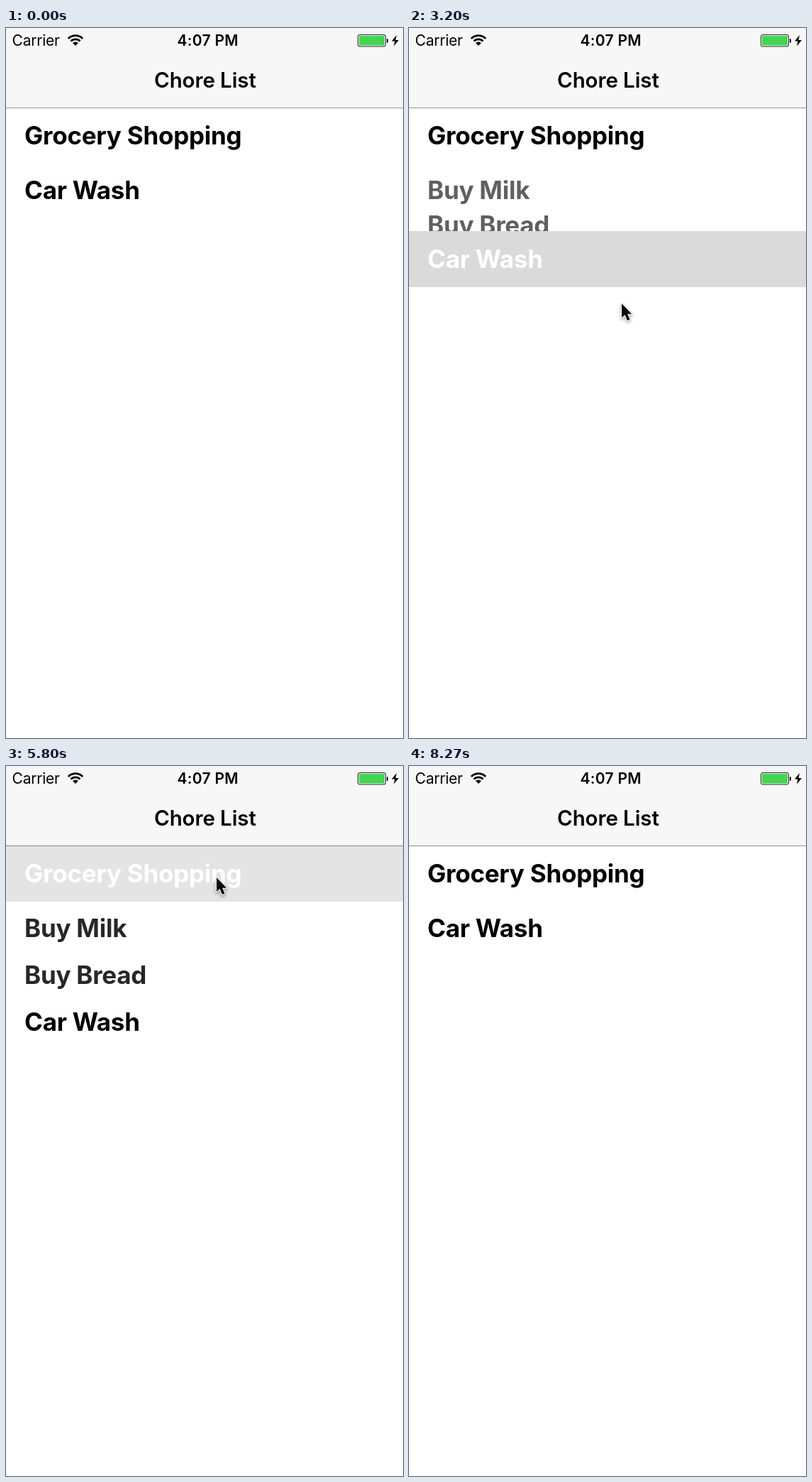
Recreate the animation shown at these times as an HTML page with a canvas. Size 560x1000 px, loop 8.67 s.

```html
<!DOCTYPE html>
<html lang="en">
<head>
<meta charset="utf-8">
<title>Chore List</title>
<style>
html, body { margin: 0; height: 100%; overflow: hidden; background: #fff; }
canvas { display: block; }
</style>
</head>
<body>
<canvas id="stage" width="560" height="1000"></canvas>
<script>
const ctx = document.getElementById('stage').getContext('2d');
const LOOP = 8670, TOP = 152, ROW = 77.5;
const SLIDE = 300, HOLD = 80, FADE = 400, GLIDE = 600, HIDE = 7530;

// Slot of each row while the list is closed and while it is open, back to front
const rows = [
  { name: 'Grocery Shopping', closed: 0, open: 0 },
  { name: 'Buy Bread', closed: 1, open: 2, child: true },
  { name: 'Buy Milk', closed: 1, open: 1, child: true },
  { name: 'Car Wash', closed: 1, open: 3 }
];

// lag: how late the screen reacts
const taps = [
  { at: 1190, name: 'Grocery Shopping', opens: 1 },
  { at: 1893, name: 'Buy Milk', lag: 177 },
  { at: 3076, name: 'Car Wash', opens: 0 },
  { at: 4590, name: 'Car Wash' },
  { at: 5575, name: 'Grocery Shopping', opens: 1 },
  { at: 6795, name: 'Car Wash', opens: 0, lag: 75 }
];

// Where the pointer arrives, and when
const stops = [
  { at: 530, x: 462, y: 203 },
  { at: 1000, x: 324, y: 157 },
  { at: 2000, x: 302, y: 247 },
  { at: 2930, x: 300, y: 388 },
  { at: 4200, x: 310, y: 174 },
  { at: 4530, x: 301, y: 205 },
  { at: 5400, x: 297, y: 157 },
  { at: 6600, x: 284, y: 393 },
  { at: 7670, x: 480, y: 200 }
];

const clamp = v => Math.min(1, Math.max(0, v));
const ease = v => { v = clamp(v); return v * v * (3 - 2 * v); };
const mix = (a, b, k) => a + (b - a) * k;
const started = t => taps.filter(tap => t >= tap.at + (tap.lag || 0));

function text(str, x, y, font, spacing = 0, color = '#000') {
  ctx.font = font + ' Inter, "Open Sans", sans-serif';
  ctx.letterSpacing = spacing + 'px';
  ctx.fillStyle = color;
  ctx.fillText(str, x, y);
}

function polygon(points) {
  ctx.beginPath();
  points.forEach(([x, y]) => ctx.lineTo(x, y));
  ctx.closePath();
}

function pill(x, y, w, h, radius, color) {
  ctx.fillStyle = color;
  ctx.beginPath();
  ctx.roundRect(x, y, w, h, radius);
  ctx.fill();
}

function openness(t) {
  return started(t)
    .filter(tap => 'opens' in tap)
    .reduce((p, tap) => mix(p, tap.opens, ease((t - tap.at) / SLIDE)), 0);
}

function drawRow(row, t, p) {
  const y = TOP + ROW * mix(row.closed, row.open, p);
  const tap = started(t).findLast(k => k.name === row.name);
  const fade = tap ? clamp((t - tap.at - HOLD) / FADE) : 1;
  const shade = Math.round(mix(217, 255, ease(fade)));
  ctx.globalAlpha = row.child ? p : 1;
  if (!row.child || p === 1) {
    ctx.fillStyle = `rgb(${shade},${shade},${shade})`;
    ctx.fillRect(0, Math.round(y - 40), 560, 79);
  }
  text(row.name, 26, y + 11.8, '700 35px', -0.25, fade < 0.385 ? '#fff' : '#000');
  ctx.globalAlpha = 1;
}

function drawWifi() {
  const from = -Math.PI * 0.75, to = -Math.PI * 0.25;
  ctx.strokeStyle = ctx.fillStyle = '#000';
  ctx.lineWidth = 2.8;
  for (const r of [14.3, 9.2]) {
    ctx.beginPath();
    ctx.arc(98, 25, r, from, to);
    ctx.stroke();
  }
  ctx.beginPath();
  ctx.moveTo(98, 25);
  ctx.arc(98, 25, 5.6, from, to);
  ctx.fill();
}

function drawBattery() {
  pill(496, 9, 40, 17.5, 3.5, '#222');
  pill(497, 10, 38, 15.5, 2.5, '#f7f7f7');
  pill(498, 11, 36, 13.5, 1.5, '#43d551');
  pill(537, 15, 2, 6, [0, 2, 2, 0], '#000');
  // The bolt is one half turned about its centre
  const half = [[2, -7.8], [-5, 0.8], [-0.5, 0.8]];
  const bolt = [...half, ...half.map(([x, y]) => [-x, -y])];
  polygon(bolt.map(([x, y]) => [549 + x, 17.8 + y]));
  ctx.fill();
}

function drawHeader() {
  ctx.fillStyle = '#f7f7f7';
  ctx.fillRect(0, 0, 560, 112);
  ctx.fillStyle = 'rgba(0,0,0,.42)';
  ctx.fillRect(0, 112, 560, 1);
  text('Carrier', 8.5, 25, '400 21px', -0.2);
  text('4:07 PM', 241.5, 25, '600 21px', 0.3);
  text('Chore List', 209, 84, '600 29.5px', -0.1);
  drawWifi();
  drawBattery();
}

function drawPointer(t) {
  const i = stops.findIndex(s => s.at > t);
  if (i < 1 || t >= HIDE) return;
  const a = stops[i - 1], b = stops[i];
  const start = Math.max(a.at, b.at - GLIDE);
  const k = ease((t - start) / (b.at - start));
  ctx.save();
  ctx.translate(mix(a.x, b.x, k), mix(a.y, b.y, k));
  polygon([[0, 0], [0, 20], [4.6, 16], [8, 24], [11.6, 22.4], [8.2, 14.8], [14.2, 14.8]]);
  ctx.lineJoin = 'round';
  ctx.lineWidth = 2;
  ctx.strokeStyle = '#fff';
  ctx.shadowColor = 'rgba(0,0,0,.45)';
  ctx.shadowBlur = 4;
  ctx.shadowOffsetY = 2;
  ctx.stroke();
  ctx.shadowColor = 'transparent';
  ctx.fillStyle = '#0a0a0a';
  ctx.fill();
  ctx.restore();
}

function frame(now) {
  const t = now % LOOP, p = openness(t);
  ctx.fillStyle = '#fff';
  ctx.fillRect(0, 0, 560, 1000);
  rows.forEach(row => drawRow(row, t, p));
  drawHeader();
  drawPointer(t);
  requestAnimationFrame(frame);
}
requestAnimationFrame(frame);
</script>
</body>
</html>
```
